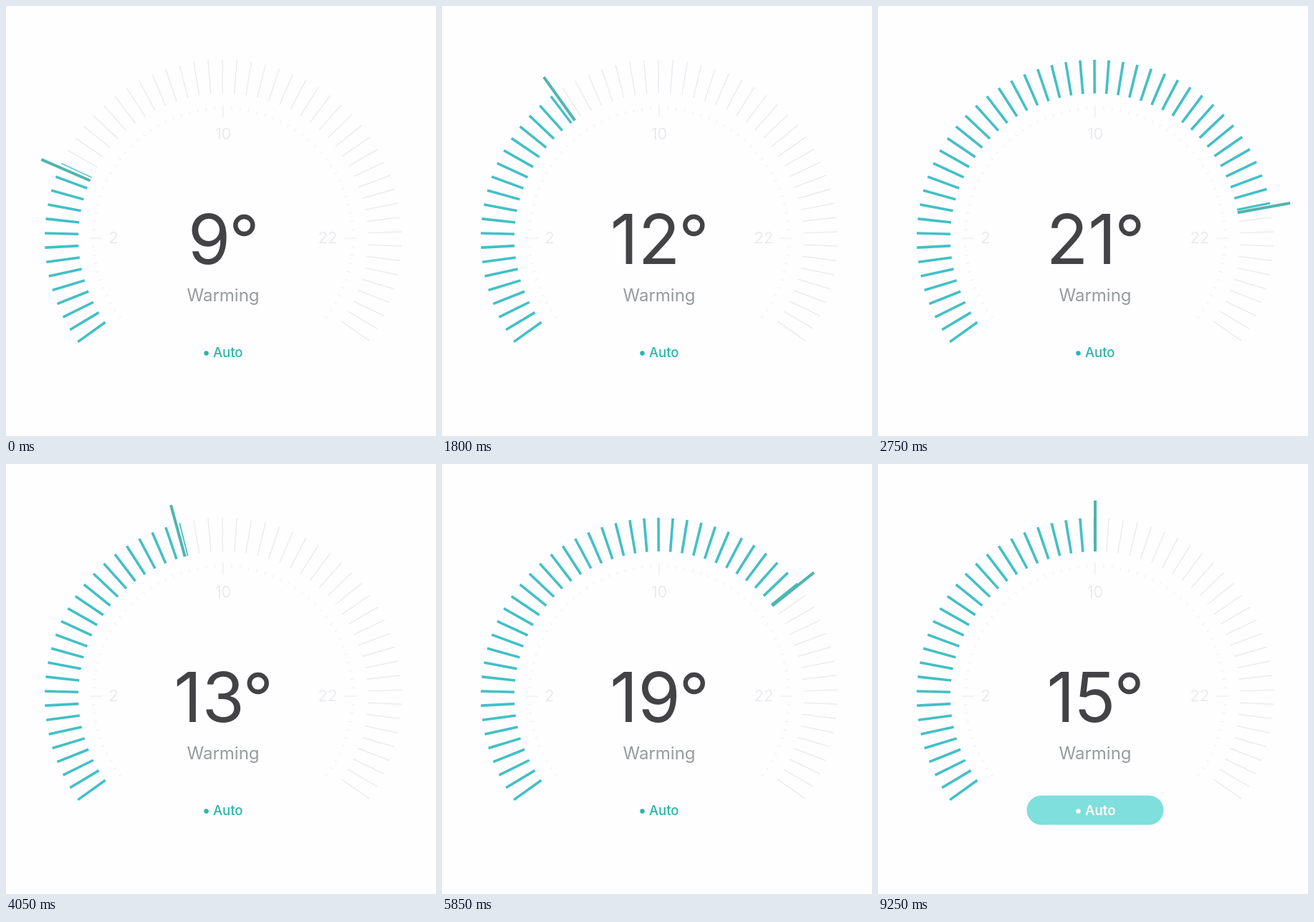
Write an HTML page with a canvas that moves like this. It is 600 px wide and 600 px high and loops after 9550 ms.

```html
<!DOCTYPE html>
<html lang="en">
<head>
<meta charset="utf-8">
<title>Thermostat dial</title>
<style>
  html, body { margin: 0; width: 100%; height: 100%; overflow: hidden; background: #fefdff; }
  canvas { display: block; width: 600px; height: 600px; }
</style>
</head>
<body>
<canvas id="stage" width="600" height="600"></canvas>
<script>
const ctx = document.getElementById('stage').getContext('2d');
const LOOP = 9550, STEP = 50;
const CX = 303, CY = 324;
const FONT = 'Inter, Roboto, sans-serif';
const TICKS = 55, FIRST = -125.5, GAP = 4.64;
const GREY = [231, 233, 238], TEAL = [66, 192, 198];
const BUTTON = [42, 181, 170], WHITE = [255, 255, 255];

// [time, needle angle from the top, speed in deg/ms]; no speed = eased jump from the key before
const KEYS = [
  [0, -66.6, 0], [1300, -66.6, 0], [1800, -35.6, 0.085], [2300, 16.5, 0.13],
  [2750, 79.8, 0.025], [3200, 84, 0], [3550, 84, 0], [3800, 70, -0.15],
  [4000, 16, -0.5], [4050, -15.3, -0.24], [4250, -32.6, 0],
  [4500, -32.6, 0], [5280, -81], [5417, -81, 0], [5997, 55.9],
  [6473, 55.9, 0], [7073, 0], [LOOP, 0, 0]
];

const clamp = x => Math.max(0, Math.min(1, x));
const mix = (a, b, k) => `rgb(${a.map((v, i) => Math.round(v + (b[i] - v) * k))})`;
const quart = p => p < 0.5 ? 8 * p ** 4 : 1 - 8 * (1 - p) ** 4;

function needleAngle(t) {
  const n = KEYS.findIndex(k => k[0] > t);
  const [t0, a0, s0 = 0] = KEYS[n - 1];
  const [t1, a1, s1] = KEYS[n];
  const d = t1 - t0, p = (t - t0) / d;
  if (s1 === undefined) return a0 + (a1 - a0) * quart(p);
  const q = p * p * (3 - 2 * p);
  return a0 + (a1 - a0) * q + d * p * (1 - p) * (s0 * (1 - p) - s1 * p);
}

function ray(deg, r0, r1, width, color) {
  const a = deg * Math.PI / 180, x = Math.sin(a), y = -Math.cos(a);
  ctx.beginPath();
  ctx.moveTo(CX + x * r0, CY + y * r0);
  ctx.lineTo(CX + x * r1, CY + y * r1);
  ctx.lineWidth = width;
  ctx.strokeStyle = color;
  ctx.stroke();
}

function text(str, x, y, font, color, align = 'center') {
  ctx.font = `${font} ${FONT}`;
  ctx.fillStyle = color;
  ctx.textAlign = align;
  ctx.fillText(str, x, y);
}

function drawScale() {
  for (let i = -34; i <= 34; i++) {
    const major = i % 24 === 0;
    ray(i * 3.75, major ? 169 : 179, major ? 186 : 183.5, 1, major ? '#e9e9ed' : '#efeff2');
  }
  text('2', 150, 331, '300 22px', '#e6e6ea');
  text('10', 303, 186, '300 22px', '#e6e6ea');
  text('22', 449, 331, '300 22px', '#e6e6ea');
}

function drawDial(angle, level) {
  for (let i = 0; i < TICKS; i++) {
    const fill = clamp(level - i + 0.5);
    ray(FIRST + i * GAP, 202, 249, 1.2 + 2.4 * fill, mix(GREY, TEAL, clamp(fill * 4)));
  }
  ctx.save();
  ctx.beginPath();
  ctx.rect(0, 51, 600, 549);
  ctx.clip();
  ray(angle, 202, 276.5, 4, '#4fb5ae');
  ctx.restore();
}

function drawReading(value) {
  ctx.font = `400 96px ${FONT}`;
  const w = ctx.measureText(value).width;
  const x = 302.5 - (w + 38) / 2;
  text(value, x, 359.5, '400 96px', '#434347', 'left');
  ctx.beginPath();
  ctx.arc(x + w + 19, 306, 12, 0, Math.PI * 2);
  ctx.lineWidth = 6.4;
  ctx.strokeStyle = '#434347';
  ctx.stroke();
  text('Warming', 303, 412, '400 24px', '#969b9c');
}

function drawButton(on) {
  ctx.globalAlpha = on;
  ctx.fillStyle = '#7fdfdc';
  ctx.beginPath();
  ctx.roundRect(207.5, 462.5, 191, 41, 20.5);
  ctx.fill();
  ctx.globalAlpha = 1;
  const color = mix(BUTTON, WHITE, on);
  text('Auto', 289, 490, (on > 0.5 ? 600 : 500) + ' 18.5px', color, 'left');
  ctx.beginPath();
  ctx.arc(279.5, 484.5, 3.2, 0, Math.PI * 2);
  ctx.fill();
}

function draw(t) {
  const angle = needleAngle(t);
  const level = (angle - FIRST) / GAP;
  ctx.fillStyle = '#fefdff';
  ctx.fillRect(0, 0, 600, 600);
  drawScale();
  drawDial(angle, level);
  drawReading(String(Math.floor(5 + level / 2.7)));
  drawButton(clamp((t - 7700) / 100));
}

const start = performance.now();
function tick() {
  const t = (performance.now() - start) % LOOP;
  draw(Math.floor(t / STEP) * STEP);
  requestAnimationFrame(tick);
}
tick();
</script>
</body>
</html>
```
